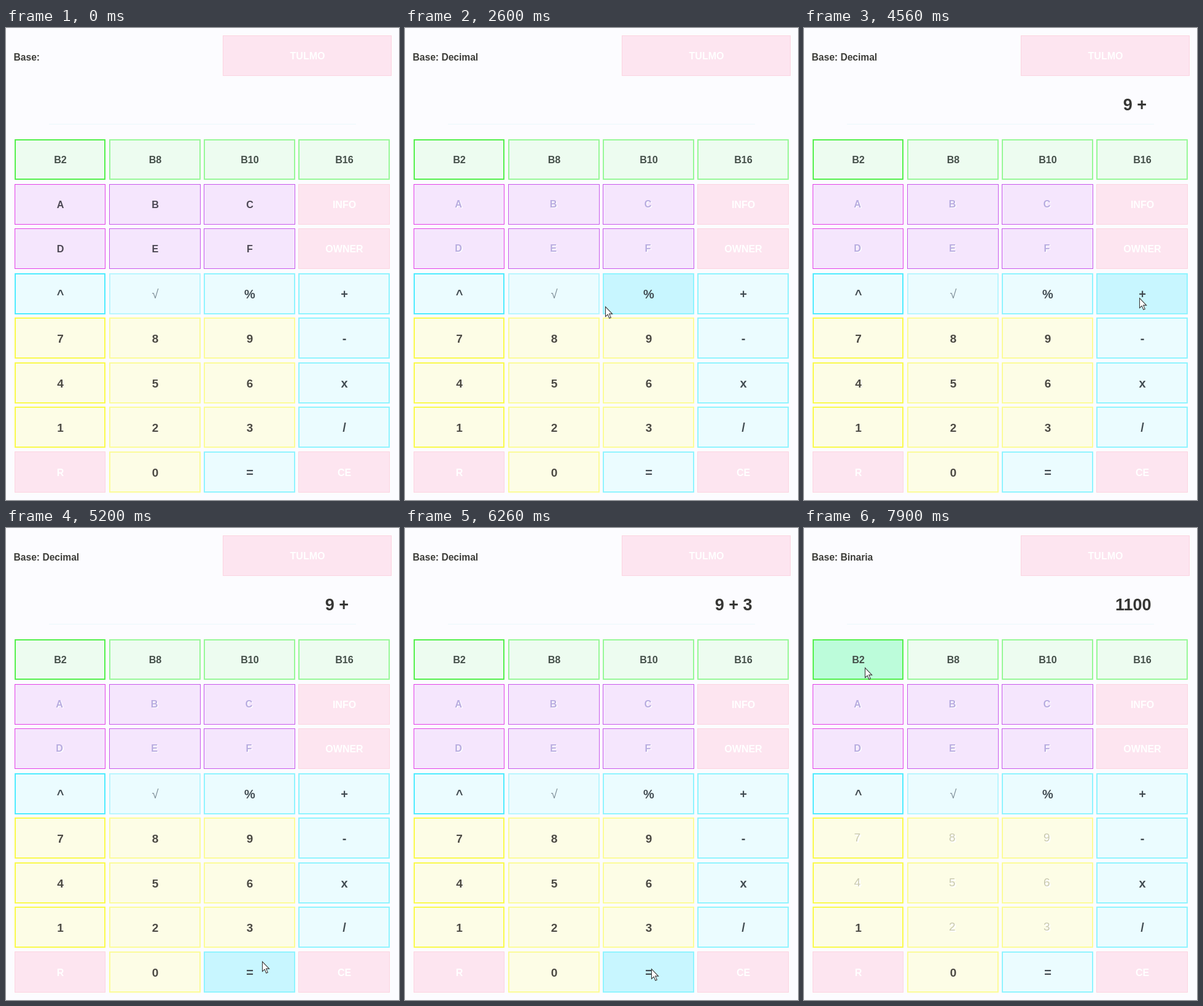
Animation, 640 px wide and 768 px high, one loop 8000 ms. Source, as an HTML page:

```html
<!DOCTYPE html>
<html lang="es">
<head>
<meta charset="utf-8">
<title>Calculadora</title>
<style>
html, body { margin: 0; width: 100%; height: 100%; overflow: hidden; background: #fcfcff; }
svg { display: block; width: 100vw; height: 100vh; }
text { font-family: "Liberation Sans", Arial, sans-serif; font-weight: bold; }
</style>
</head>
<body>
<svg id="stage" viewBox="0 0 640 768"></svg>
<script>
const LOOP = 8000;
const stage = document.getElementById('stage');

function add(tag, attrs, label) {
  const el = document.createElementNS('http://www.w3.org/2000/svg', tag);
  for (const k in attrs) el.setAttribute(k, attrs[k]);
  if (label !== undefined) el.textContent = label;
  stage.appendChild(el);
  return el;
}

// Key styles: fill, hovered fill, border, first-column border, text, disabled text, text size
const styles = {
  base:  { fill: '#edfcf0', over: '#bcfcda', line: '#98f898', first: '#54f04c', ink: '#45504a', size: 16.2 },
  hex:   { fill: '#f5e6fd', over: '#ecccfc', line: '#c858ec', first: '#e440e8', ink: '#4c4854', off: '#b8ace0', size: 16.2 },
  op:    { fill: '#ebfcff', over: '#c8f6ff', line: '#90f4ff', first: '#50ecff', ink: '#424c52', size: 20 },
  num:   { fill: '#fdfde6', over: '#fbfbcc', line: '#fcfc98', first: '#fafa4c', ink: '#4c4a44', off: '#cacab0', size: 19 },
  extra: { fill: '#fde5f0', over: '#fcd4e4', line: '#fcd4e0', first: '#fcd4e0', ink: '#ffffff', size: 16 }
};

const rows = [
  ['B2', 'B8', 'B10', 'B16'],
  ['A', 'B', 'C', 'INFO'],
  ['D', 'E', 'F', 'OWNER'],
  ['^', '√', '%', '+'],
  ['7', '8', '9', '-'],
  ['4', '5', '6', 'x'],
  ['1', '2', '3', '/'],
  ['R', '0', '=', 'CE']
];

function kindOf(label) {
  if (/^B\d/.test(label)) return 'base';
  if (/^[A-F]$/.test(label)) return 'hex';
  if (/^\d$/.test(label)) return 'num';
  return label.length > 1 || label === 'R' ? 'extra' : 'op';
}

function makeKey(label, x, y, w, h, col) {
  const kind = kindOf(label), s = styles[kind];
  const lw = kind === 'hex' || kind === 'extra' ? 1 : 2;
  const box = add('rect', {
    x: x + lw / 2, y: y + lw / 2, width: w - lw, height: h - lw,
    fill: s.fill, stroke: label === '√' ? '#b8f6ff' : col ? s.line : s.first, 'stroke-width': lw
  });
  const cx = x + w / 2 + .5, cy = y + h / 2 + s.size * .36 + .6;
  const at = { x: cx, y: cy, 'font-size': s.size, 'text-anchor': 'middle' };
  const glow = add('text', { ...at, fill: '#fff' }, label);
  const ink = label === '√' ? '#7c8c96' : s.ink;
  const text = add('text', { ...at, fill: ink }, label);
  if (label === '√') text.style.fontWeight = 'normal';
  return { label, kind, x, y, w, h, cx, cy, box, text, glow, s, ink };
}

add('rect', { width: 640, height: 768, fill: '#fcfcff' });
const baseText = add('text', { x: 12.6, y: 52.6, 'font-size': 15.6, fill: '#3c3c38' });
add('path', { d: 'M70 156.5H570', stroke: '#ebf8fc' });
const display = add('text', { x: 565.6, y: 134.3, 'font-size': 27, 'text-anchor': 'end', fill: '#363634' });

const keys = rows.flatMap((labels, r) => labels.map((label, c) =>
  makeKey(label, 14 + c * 154, Math.round(181 + r * 72.55), c ? 149 : 148, r < 3 ? 66 : 67, c)));
keys.push(makeKey('TULMO', 353, 12, 275, 66, 3));

const cursor = add('path', {
  d: 'M.5 .5V16.5L4.2 13.1L6.8 19.2L9.3 18.1L6.7 12.1H11.6Z',
  fill: '#fff', stroke: '#3a3a3a', 'stroke-width': 1.1
});

// Pointer path: time, x, y
const path = [
  [1800, 135, 9], [1930, 386, 214], [2330, 386, 214], [2600, 326, 453],
  [2930, 372, 507], [3460, 372, 507], [3960, 379, 521], [4060, 400, 532],
  [4280, 530, 452], [4480, 546, 438], [4640, 546, 440], [5090, 432, 650],
  [5200, 417, 705], [5320, 414, 712], [5560, 394, 656], [5740, 394, 656],
  [5960, 399, 708], [6260, 401, 717], [6500, 401, 717], [6760, 130, 702],
  [7050, 112, 560], [7600, 99, 227], [8000, 99, 227]
];

function pointer(t) {
  if (t < path[0][0]) return null;
  const i = path.findIndex(p => p[0] > t);
  const a = path[i - 1], b = path[i];
  const u = (t - a[0]) / (b[0] - a[0]);
  const e = u * u * (3 - 2 * u);
  return [a[1] + (b[1] - a[1]) * e, a[2] + (b[2] - a[2]) * e];
}

// Last value whose start time has passed
const latest = (list, t) => list.reduce((v, [at, next]) => t >= at ? next : v, '');
const shown = [[3480, '9'], [4500, '9 +\u00a0'], [5640, '9 + 3'], [6420, '12'], [7660, '1100']];
const bases = [[2340, 'Decimal'], [7660, 'Binaria']];

function isOff(key, base) {
  if (!base) return false;
  return key.kind === 'hex' || (base === 'Binaria' && key.kind === 'num' && key.label > '1');
}

function render(t) {
  const p = pointer(t), base = latest(bases, t);
  baseText.textContent = 'Base: ' + base;
  display.textContent = latest(shown, t);
  for (const k of keys) {
    const over = p && p[0] >= k.x && p[0] < k.x + k.w && p[1] >= k.y && p[1] < k.y + k.h;
    const off = isOff(k, base), d = off ? k.s.size * .09 : 0;
    k.box.setAttribute('fill', over ? k.s.over : k.s.fill);
    k.glow.setAttribute('visibility', off ? 'visible' : 'hidden');
    k.text.setAttribute('x', k.cx - d);
    k.text.setAttribute('y', k.cy - d);
    k.text.setAttribute('fill', off ? k.s.off : k.ink);
    if (k.kind === 'num') k.text.style.fontWeight = off ? 'normal' : 'bold';
  }
  cursor.setAttribute('visibility', p ? 'visible' : 'hidden');
  if (p) cursor.setAttribute('transform', `translate(${p[0]} ${p[1]})`);
}

const start = performance.now();
function tick() {
  render((performance.now() - start) % LOOP);
  requestAnimationFrame(tick);
}
tick();
</script>
</body>
</html>
```
